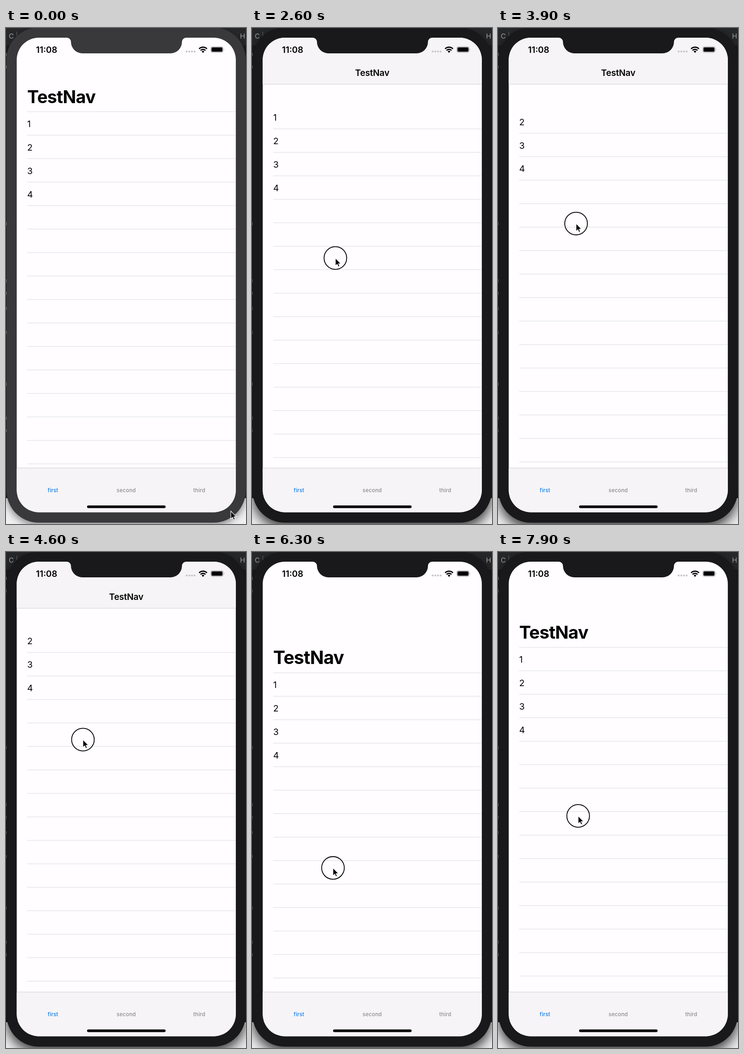
Recreate the animation shown at these times as an HTML page. Size 521x1076 px, loop 8 s.

```html
<!DOCTYPE html>
<html lang="en">
<head>
<meta charset="utf-8">
<style>
  html, body { margin: 0; width: 100%; height: 100%; overflow: hidden; background: #27282a; }
  svg { display: block; width: 521px; height: 1076px; font-family: Inter, "Open Sans", sans-serif; }
  .line { fill: #e1e0e4; }
  .bar { fill: #f6f4f6; }
  .rule { fill: #cfced2; }
  .row { font-size: 19.2px; }
  .time { font-size: 18.8px; font-weight: 600; }
  .large { font-size: 38px; font-weight: 700; letter-spacing: -.02em; }
  .inline { font-size: 19px; font-weight: 600; letter-spacing: -.01em; text-anchor: middle; }
  .tab { font-size: 11.5px; font-weight: 500; letter-spacing: .2px; text-anchor: middle; fill: #8b8a8d; }
  .edge { font-size: 15px; fill: #a6a7a9; }
  #bezel, #notch { fill: #39383a; }
  #bezel { filter: drop-shadow(0 6px 8px rgba(0, 0, 0, .45)); }
  .pressed #bezel, .pressed #notch { fill: #19181b; }
  .pressed #bezel { filter: drop-shadow(0 12px 13px rgba(0, 0, 0, .75)); }
  svg:not(.pressed) #touch { display: none; }
</style>
</head>
<body>
<svg id="stage" viewBox="0 0 521 1076">
  <defs>
    <clipPath id="screen"><rect x="23.3" y="21" width="475.6" height="1029.5" rx="48"/></clipPath>
    <clipPath id="listArea"><rect x="23" y="181" width="476" height="774"/></clipPath>
  </defs>

  <rect width="521" height="1076" fill="#27282a"/>
  <rect y="38" width="521" height="982" fill="#1c1d1f"/>
  <rect y="1020" width="521" height="56" fill="#efeef0"/>
  <text class="edge" x="6" y="23">C</text>
  <rect x="23" y="8" width="1" height="9" fill="#6b6c6e"/>
  <text class="edge" x="508" y="23">H</text>
  <g id="marks" fill="#8e8f91"></g>
  <rect id="bezel" x="1" y="-1" width="519.5" height="1074" rx="70"/>

  <g clip-path="url(#screen)">
    <rect width="521" height="1076" fill="#fffdff"/>
    <g clip-path="url(#listArea)"><g id="list"></g></g>
    <g id="large"><text class="large" x="0" y="0">TestNav</text></g>
    <g id="navBar">
      <rect class="bar" x="23" y="21" width="476" height="101"/>
      <rect class="rule" x="23" y="121.5" width="476" height="1"/>
    </g>
    <text id="inline" class="inline" x="261" y="104">TestNav</text>
    <rect class="bar" x="23" y="955" width="476" height="96"/>
    <rect class="rule" x="23" y="954" width="476" height="1"/>
    <text class="tab" x="102" y="1007" style="fill:#0f7be6">first</text>
    <text class="tab" x="261" y="1007">second</text>
    <text class="tab" x="419.5" y="1007">third</text>
    <rect x="176" y="1035.7" width="170.5" height="5.8" rx="2.9"/>
  </g>

  <path id="notch" d="M132 20V21A9 9 0 0 1 141 30A25 25 0 0 0 166 55H357A25 25 0 0 0 382 30A9 9 0 0 1 391 21V20Z"/>
  <text class="time" x="65" y="53.5">11:08</text>
  <g fill="#c4c3c7">
    <circle cx="392.2" cy="51" r="2.1"/><circle cx="398" cy="51" r="2.1"/>
    <circle cx="403.7" cy="51" r="2.1"/><circle cx="409.4" cy="51" r="2.1"/>
  </g>
  <g fill="none" stroke="#000" stroke-width="2.7">
    <path d="M419.2 45.3A11.8 11.8 0 0 1 436.2 45.3"/>
    <path d="M422.3 48.6A7.6 7.6 0 0 1 433.1 48.6"/>
  </g>
  <path d="M424.7 50.8A4.2 4.2 0 0 1 430.7 50.8L427.7 53.9Z"/>
  <rect x="444.5" y="40.5" width="27" height="12.5" rx="3.6" fill="none" stroke="#99989b"/>
  <rect x="446" y="42" width="24" height="9.5" rx="2.3"/>
  <path d="M473 44.7Q474.8 46.7 473 48.8Z" fill="#99989b"/>

  <g id="pointer">
    <circle id="touch" r="24.6" fill="none" stroke="#000" stroke-width="1.8"/>
    <path d="M0 0V17L3.9 13.4L6.3 19L9.2 17.8L6.8 12.3H12Z" stroke="#fff" stroke-width="1.2"/>
  </g>
</svg>
<script>
const LOOP = 8000, STEP = 100;
const PRESS = 2000, COLLAPSE = 2300, EXPAND = 5300, FADE = 200;
const REST_Y = 525.5, LAG = 25, LIST_TOP = 181.5, PITCH = 50.93;

// Pointer path: time, x, y
const path = [
  [0, 488, 1048], [300, 385, 800], [700, 107, 315], [900, 112, 274], [1100, 125, 245],
  [1500, 161, 390], [1800, 187, 512], [2000, 185, 525.5], [2300, 184, 519], [2600, 181, 499],
  [3300, 173.5, 456.5], [4000, 169, 420], [4600, 167, 407], [5000, 167, 438], [5300, 169, 530],
  [5500, 171, 608], [5900, 174, 665], [6400, 176, 687], [7000, 175.5, 678], [7900, 174, 572.5]
];

const $ = id => document.getElementById(id);
const clamp = v => Math.max(0, Math.min(1, v));
const show = (id, on) => $(id).style.visibility = on ? 'visible' : 'hidden';
const slope = (i, k) => {
  const a = path[Math.max(0, i - 1)], b = path[Math.min(path.length - 1, i + 1)];
  return (b[k] - a[k]) / (b[0] - a[0]);
};

// Cubic Hermite interpolation of column k
function along(t, k) {
  const next = path.findIndex(p => p[0] > t);
  if (next < 0) return path[path.length - 1][k];
  const i = Math.max(0, next - 1), a = path[i], b = path[i + 1];
  const span = b[0] - a[0], u = clamp((t - a[0]) / span), v = 1 - u;
  return v * v * (1 + 2 * u) * a[k] + u * u * (3 - 2 * u) * b[k]
    + span * u * v * (v * slope(i, k) - u * slope(i + 1, k));
}

// The list follows the drag with resistance
function scrollAt(t) {
  if (t <= PRESS) return 0;
  const pull = along(t - LAG, 2) - REST_Y;
  return pull * (pull < 0 ? .55 : .505);
}

function draw(now) {
  const t = Math.floor(now % LOOP / STEP) * STEP;
  const collapsed = t >= COLLAPSE && t < EXPAND;
  const scroll = scrollAt(t);

  $('stage').classList.toggle('pressed', t >= PRESS);
  $('list').setAttribute('transform', `translate(0 ${LIST_TOP + scroll})`);
  $('large').setAttribute('transform',
    `translate(46 ${LIST_TOP - 18.7 + scroll}) scale(${1 + Math.max(0, scroll) * .00044})`);
  show('large', !collapsed);
  show('navBar', collapsed);
  $('inline').style.opacity = t < EXPAND
    ? clamp((t - COLLAPSE) / FADE) : clamp(1 - (t - EXPAND) / FADE);
  $('pointer').setAttribute('transform', `translate(${along(t, 1)} ${along(t, 2)})`);
}

let rows = '';
for (let i = 0; i < 18; i++) {
  rows += `<rect class="line" x="46" y="${i * PITCH - .5}" width="453" height="1.2"/>`;
  if (i < 4) rows += `<text class="row" x="46" y="${i * PITCH + 33.3}">${i + 1}</text>`;
}
$('list').innerHTML = rows;
$('marks').innerHTML = [57, 84, 424, 548, 575, 608, 660, 772, 846, 873]
  .map(y => `<rect y="${y - 3}" width="1.2" height="7"/>`).join('');

const start = performance.now();
function tick() {
  draw(performance.now() - start);
  requestAnimationFrame(tick);
}
tick();
</script>
</body>
</html>
```
